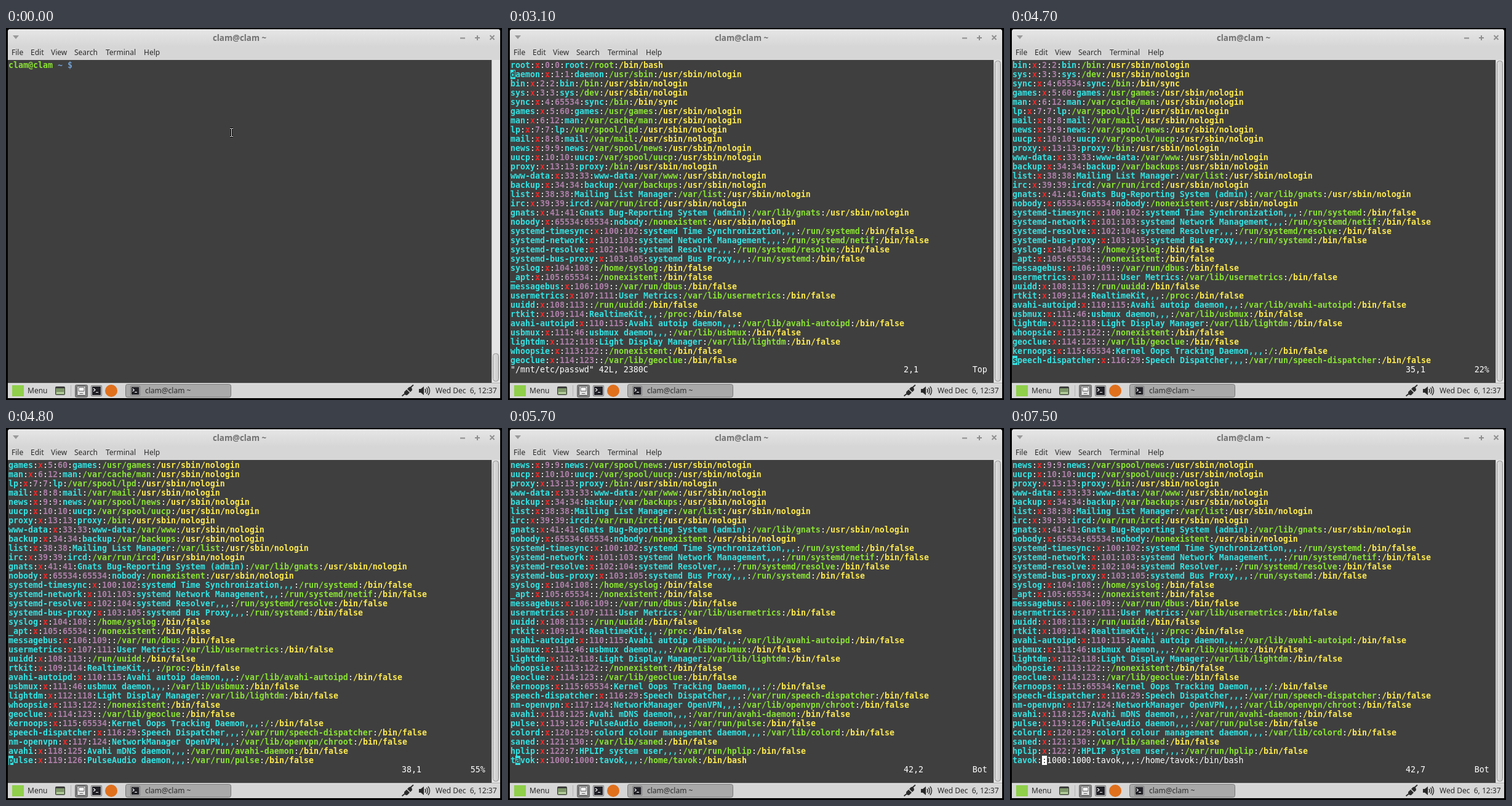
Recreate the animation shown at these times as an HTML page. Size 806x605 px, loop 8000 ms.

```html
<!DOCTYPE html>
<html lang="en">
<head>
<meta charset="utf-8">
<title>Terminal session</title>
<style>
  html, body { margin: 0; width: 100%; height: 100%; overflow: hidden; background: #000; }
  svg { position: absolute; left: 0; top: 0; display: block; }
  text { font: 12px "Noto Sans", sans-serif; fill: #2b2b2b; white-space: pre; }
  .title { font-weight: bold; font-size: 13.333px; fill: #707070; text-anchor: middle; }
  #term text { font: 13.288px "DejaVu Sans Mono", monospace; }
</style>
</head>
<body>
<svg width="806" height="605" viewBox="0 0 806 605">
  <defs>
    <linearGradient id="bar" x2="0" y2="1">
      <stop stop-color="#e6e6e6"/><stop offset="1" stop-color="#d6d6d6"/>
    </linearGradient>
    <linearGradient id="thumb" x2="1" y2="0">
      <stop stop-color="#dedede"/><stop offset="1" stop-color="#cacaca"/>
    </linearGradient>
    <g id="prompt">
      <rect width="18" height="18" rx="2" fill="#6e6e6e"/>
      <rect x="1" y="1" width="16" height="16" rx="1" fill="#cfcfcf"/>
      <rect x="2" y="2" width="14" height="14" fill="#202026"/>
      <path d="M4 5l3 2.5-3 2.500M8 11.500h4" fill="none" stroke="#fff" stroke-width="1.200"/>
    </g>
    <path id="beam" d="M364 163.500h2l.5 1 .5-1h2M366.500 164v12M364 176.500h2l.5-1 .5 1h2" fill="none"/>
  </defs>

  <!-- window -->
  <path d="M3 52V6q0-4 4-4h792q4 0 4 4v46z" fill="#d6d6d6"/>
  <path d="M3 30V6q0-4 4-4h792q4 0 4 4v24z" fill="url(#bar)"/>
  <path d="M11 12h10l-5 6z" fill="#999"/>
  <path d="M738 16.500h8M762 16h8M766 12v8M786.500 12l7 7M793.500 12l-7 7" fill="none" stroke="#8e8e8e" stroke-width="2"/>
  <text class="title" x="379.5" y="21">clam@clam ~</text>
  <g id="menu"></g>
  <rect x="3" y="52" width="786" height="525" fill="#3f3f3f"/>
  <rect x="789" y="52" width="14" height="525" fill="#e4e4e4"/>
  <path d="M789.500 52v525" stroke="#c2c2c2"/>
  <rect id="slider" x="791.5" width="9" rx="4" fill="url(#thumb)" stroke="#8f8f8f"/>

  <!-- panel -->
  <rect x="3" y="577" width="800" height="25" fill="#d6d6d6"/>
  <path d="M3 577.500h800" stroke="#a6a6a6"/>
  <path d="M3 578.500h800" stroke="#e6e6e6"/>
  <rect x="10" y="581" width="19" height="18" fill="#8fcf4a"/>
  <text x="35" y="594">Menu</text>
  <rect x="80.500" y="583.500" width="15" height="13" rx="1" fill="#7d9668" stroke="#3c3c3c"/>
  <path d="M81 585h14" stroke="#3c3c3c" stroke-width="2"/>
  <rect x="82" y="592" width="12" height="3" fill="#b4cc9c"/>
  <path d="M105.500 581v18" stroke="#b4b4b4"/>
  <rect x="112.500" y="580.500" width="20" height="20" rx="2" fill="#858585" stroke="#666"/>
  <rect x="115.500" y="582.500" width="14" height="15" rx="1" fill="#dedede" stroke="#484848"/>
  <path d="M118 584.500h9v6h-9zM120 594.500h5" fill="#f4f4f4" stroke="#666"/>
  <use href="#prompt" x="138" y="581"/>
  <circle cx="171" cy="590" r="10" fill="#e0701c"/>
  <rect x="194.500" y="579.500" width="171" height="21" rx="3" fill="#a9a9a9" stroke="#777"/>
  <use href="#prompt" transform="translate(202 582) scale(.9)"/>
  <text x="226" y="594">clam@clam ~</text>

  <!-- tray -->
  <path d="M643.500 598.500l5-4M657 585l5-4.500" stroke="#2b2b2b" stroke-width="1.800"/>
  <path d="M647 592l4-4 5 5-4 4q-5 1-5-5zM652 587l3-3q5-1 5 5l-3 3z" fill="#2b2b2b"/>
  <path d="M671 587h3l5-4v14l-5-4h-3z" fill="#2b2b2b"/>
  <path d="M681 587q2 3 0 6M683.500 585q3.500 5 0 10M686 583q5 7 0 14" fill="none" stroke="#2b2b2b" stroke-width="1.400"/>
  <text x="698" y="594">Wed Dec&#160; 6, 12:37</text>

  <g id="term"></g>
  <g id="mouse">
    <use href="#beam" stroke="#000" stroke-width="3"/>
    <use href="#beam" stroke="#fff"/>
  </g>
</svg>

<script>
const LOOP = 8000, ROWS = 33;
const LEFT = 4, TOP = 53, CELL_W = 8, CELL_H = 15, BASE = 12;
const WHITE = '#fff', CYAN = '#34e2e2', RED = '#ef2929', PURPLE = '#ad7fa8',
      GREEN = '#8ae234', YELLOW = '#fce94f', BLUE = '#729fcf', DARK = '#3f3f3f';
const FIELDS = [CYAN, RED, PURPLE, PURPLE, CYAN, GREEN, YELLOW];
const $ = id => document.getElementById(id);

// "!" stands for the usual no-login shell, "-" at the end for /bin/false
const users = `root:x:0:0:root:/root:/bin/bash
daemon:x:1:1:daemon:/usr/sbin:!
bin:x:2:2:bin:/bin:!
sys:x:3:3:sys:/dev:!
sync:x:4:65534:sync:/bin:/bin/sync
games:x:5:60:games:/usr/games:!
man:x:6:12:man:/var/cache/man:!
lp:x:7:7:lp:/var/spool/lpd:!
mail:x:8:8:mail:/var/mail:!
news:x:9:9:news:/var/spool/news:!
uucp:x:10:10:uucp:/var/spool/uucp:!
proxy:x:13:13:proxy:/bin:!
www-data:x:33:33:www-data:/var/www:!
backup:x:34:34:backup:/var/backups:!
list:x:38:38:Mailing List Manager:/var/list:!
irc:x:39:39:ircd:/var/run/ircd:!
gnats:x:41:41:Gnats Bug-Reporting System (admin):/var/lib/gnats:!
nobody:x:65534:65534:nobody:/nonexistent:!
systemd-timesync:x:100:102:systemd Time Synchronization,,,:/run/systemd:-
systemd-network:x:101:103:systemd Network Management,,,:/run/systemd/netif:-
systemd-resolve:x:102:104:systemd Resolver,,,:/run/systemd/resolve:-
systemd-bus-proxy:x:103:105:systemd Bus Proxy,,,:/run/systemd:-
syslog:x:104:108::/home/syslog:-
_apt:x:105:65534::/nonexistent:-
messagebus:x:106:109::/var/run/dbus:-
usermetrics:x:107:111:User Metrics:/var/lib/usermetrics:-
uuidd:x:108:113::/run/uuidd:-
rtkit:x:109:114:RealtimeKit,,,:/proc:-
avahi-autoipd:x:110:115:Avahi autoip daemon,,,:/var/lib/avahi-autoipd:-
usbmux:x:111:46:usbmux daemon,,,:/var/lib/usbmux:-
lightdm:x:112:118:Light Display Manager:/var/lib/lightdm:-
whoopsie:x:113:122::/nonexistent:-
geoclue:x:114:123::/var/lib/geoclue:-
kernoops:x:115:65534:Kernel Oops Tracking Daemon,,,:/:-
speech-dispatcher:x:116:29:Speech Dispatcher,,,:/var/run/speech-dispatcher:-
nm-openvpn:x:117:124:NetworkManager OpenVPN,,,:/var/lib/openvpn/chroot:-
avahi:x:118:125:Avahi mDNS daemon,,,:/var/run/avahi-daemon:-
pulse:x:119:126:PulseAudio daemon,,,:/var/run/pulse:-
colord:x:120:129:colord colour management daemon,,,:/var/lib/colord:-
saned:x:121:130::/var/lib/saned:-
hplip:x:122:7:HPLIP system user,,,:/var/run/hplip:-
tavok:x:1000:1000:tavok,,,:/home/tavok:/bin/bash`
  .split('\n').map(s => s.replace(/!$/, '/usr/sbin/nologin').replace(/:-$/, ':/bin/false'));

// A row is a list of [text, colour] runs; coloured runs are bold.
const userRow = s => s.split(':').flatMap((f, i) => i ? [[':', WHITE], [f, FIELDS[i]]] : [[f, FIELDS[i]]]);
const rows = users.map(userRow);
const last = users[users.length - 1];
const editedRow = [['tavok', CYAN], [last.slice(5).replace('x', ''), WHITE]];
const promptRow = [['clam@clam', GREEN], [' ', WHITE], ['~ $', BLUE], [' ', WHITE]];
const commandRow = [...promptRow, ['sudo vim /mnt/etc/passwd', WHITE]];

function svg(tag, attrs, style, text = '') {
  const el = document.createElementNS('http://www.w3.org/2000/svg', tag);
  for (const name in attrs) el.setAttribute(name, attrs[name]);
  Object.assign(el.style, style);
  el.textContent = text;
  return el;
}

const weight = color => color === WHITE ? 'normal' : 'bold';

// Text on the character grid
const cells = (text, row, col, fill, fontWeight) =>
  svg('text', { x: LEFT + col * CELL_W, y: TOP + row * CELL_H + BASE }, { fill, fontWeight }, text);

function drawRow(runs, row) {
  let col = 0;
  return runs.map(([text, color]) => {
    const el = cells(text, row, col, color, weight(color));
    col += text.length;
    return el;
  });
}

function drawCursor(runs, row, col) {
  const chars = runs.flatMap(([text, color]) => [...text].map(ch => [ch, color]));
  const [ch, color] = chars[col] || [' ', WHITE];
  const box = { x: LEFT + col * CELL_W, y: TOP + row * CELL_H, width: CELL_W, height: CELL_H };
  return [svg('rect', box, { fill: color }), cells(ch, row, col, DARK, weight(color))];
}

function show(view, row, col, on, sliderTop) {
  $('term').replaceChildren(...view.flatMap(drawRow), ...(on ? drawCursor(view[row], row, col) : []));
  $('slider').setAttribute('y', sliderTop + 0.5);
  $('slider').setAttribute('height', 574 - sliderTop);
}

function drawShell({ typed, on }) {
  show([typed ? commandRow : promptRow], 0, 38, on, 529);
}

function drawEditor({ line, col, on, edited }) {
  const top = Math.max(0, line - ROWS), hidden = rows.length - ROWS;
  const view = rows.slice(top, top + ROWS);
  if (edited) view[ROWS - 1] = editedRow;
  const where = top === 0 ? 'Top' : top === hidden ? 'Bot' : Math.floor(top * 100 / hidden) + '%';
  const message = top ? '' : '"/mnt/etc/passwd" 42L, 2380C';
  const status = message.padEnd(80) + (line + ',' + col).padEnd(14) + where;
  show([...view, [[status, WHITE]]], line - top - 1, col - 1, on, 53);
}

const shell = (at, typed, on) => ({ at, draw: drawShell, typed, on });
const edit = (at, line, col = 1, on = true, edited = false) => ({ at, draw: drawEditor, line, col, on, edited });

const steps = [
  shell(0, false, false), shell(500, true, false), shell(700, true, true),
  shell(1500, true, false), shell(1900, true, true),
  edit(2100, 1), edit(2700, 1, 1, false), edit(3100, 2)
];
// key held down: steady repeat until the view starts to scroll
for (let k = 1; k <= 10; k++) steps.push(edit(3600 + k * 100, Math.round(2 + k * 3.2)));
[35, 38, 41].forEach((line, i) => steps.push(edit(4700 + i * 100, line)));
[5100, 5700, 5900, 6100, 6400, 6600, 6800].forEach((at, i) => steps.push(edit(at, 42, i + 1)));
steps.push(edit(7400, 42, 7, false), edit(7500, 42, 7, true, true));

const menu = { File: 9, Edit: 40, View: 73, Search: 111, Terminal: 162, Help: 224 };
for (const [name, x] of Object.entries(menu)) $('menu').append(svg('text', { x, y: 44 }, {}, name));

const start = performance.now();
let shown = null;
function tick() {
  const t = (performance.now() - start) % LOOP;
  const step = steps.findLast(s => s.at <= t);
  if (step !== shown) {
    step.draw(step);
    $('mouse').style.display = step.at ? 'none' : '';
    shown = step;
  }
  requestAnimationFrame(tick);
}
tick();
</script>
</body>
</html>
```
